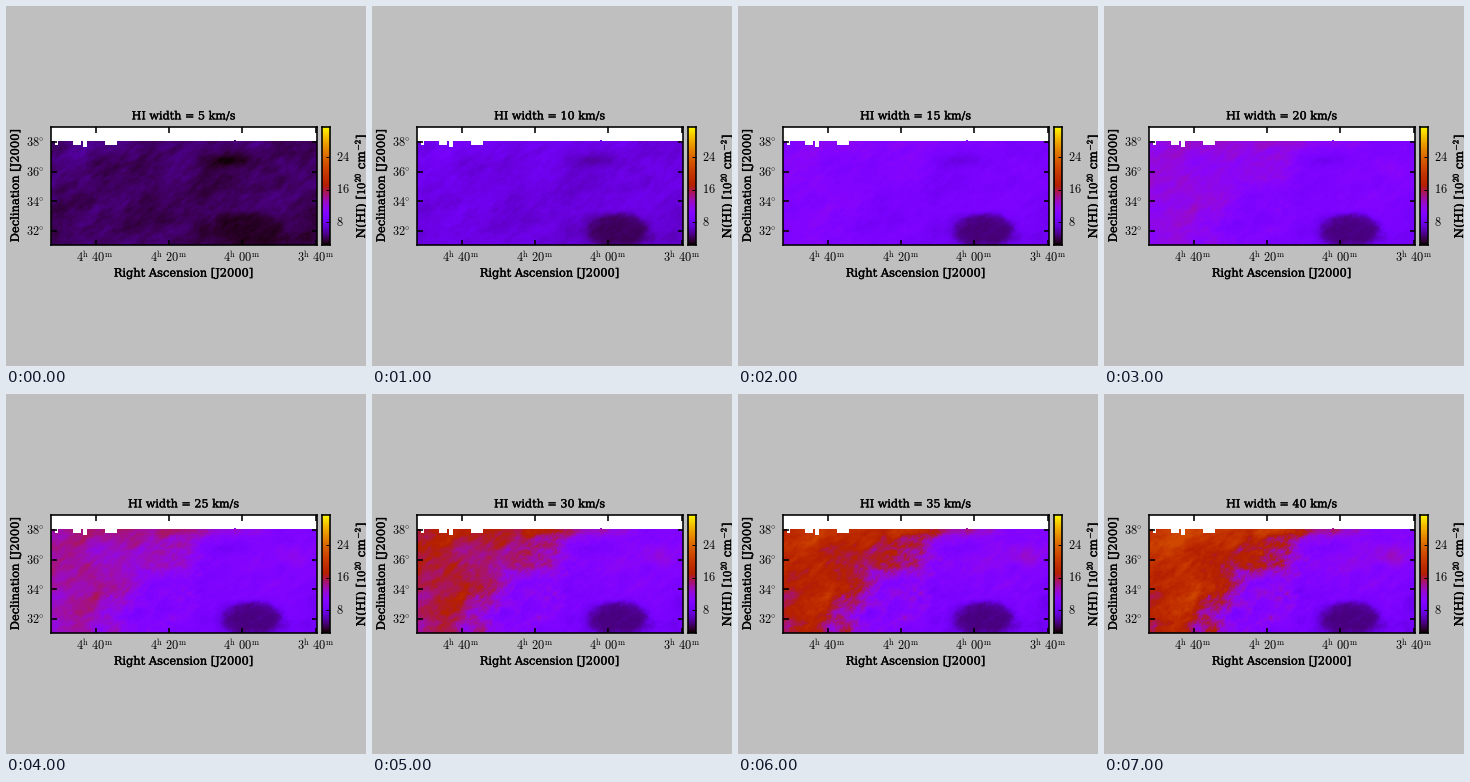
A matplotlib script for the animation above (8000 ms loop, 360x360 px).

```python
import numpy as np
import matplotlib.pyplot as plt
from matplotlib.animation import FuncAnimation
from matplotlib.patheffects import withStroke

SIZE = 360
LEFT, RIGHT, TOP, BOTTOM = 45, 311, 121, 239
DATA_TOP = 136
STEPS, WIDTH_STEP = 8, 5

plt.rcParams.update({"font.family": "DejaVu Serif", "mathtext.fontset": "cm"})
fig = plt.figure(figsize=(5, 5), dpi=72, facecolor="0.75")

X, Y = np.meshgrid(np.arange(LEFT, RIGHT) + 0.5, np.arange(TOP, BOTTOM) + 0.5)


def noise(seed, slope, stretch):
    """Power-law noise, drawn out along the rising diagonal."""
    white = np.random.default_rng(seed).normal(size=X.shape)
    ky = np.fft.fftfreq(X.shape[0])[:, None]
    kx = np.fft.fftfreq(X.shape[1])[None, :]
    a = np.radians(33)
    along = kx * np.cos(a) - ky * np.sin(a)
    across = kx * np.sin(a) + ky * np.cos(a)
    k = np.hypot(along * stretch, across) + 0.012
    field = np.fft.ifft2(np.fft.fft2(white) * k ** -slope).real
    return (field - field.mean()) / field.std()


def bump(x, y, sx, sy):
    return np.exp(-((X - x) / sx) ** 2 - ((Y - y) / sy) ** 2)


def sigmoid(z):
    return 1 / (1 + np.exp(-np.clip(z, -40, 40)))


CLOUD, WISPS, EDGE = noise(4, 1.7, 1.8), noise(11, 1.6, 2.2), noise(23, 1.6, 1.3)

# Share of the cloud on the left of a soft diagonal border
EAST = sigmoid((92 + (BOTTOM - Y) * 1.02 - X + 15 * EDGE) / 20)

# Regions that stay faint, brighten with width, or brighten late
COLD = 0.035 * (bump(218, 155, 28, 7) + bump(235, 225, 50, 20))
WARM = (0.09 * bump(290, 163, 13, 10) + 0.12 * bump(205, 138, 52, 5)
        + 0.05 * bump(240, 163, 50, 22))
LATE = 0.25 * bump(75, 150, 40, 18)

radius = ((X - 248) / 31) ** 2 + ((Y - 225) / 17) ** 2
HOLE = sigmoid(5 * (1 - radius + 0.13 * EDGE))

# Survey edge: empty top strip with a few ragged notches and one stray cell
EMPTY = Y < DATA_TOP
for x0, x1, depth in [(49, 52, 4), (67, 75, 4), (77, 81, 6), (99, 111, 4)]:
    EMPTY |= (X > x0) & (X < x1) & (Y < DATA_TOP + depth)
EMPTY &= ~((abs(X - 229) < 1) & (Y > DATA_TOP - 1))


def column_density(width):
    base = 0.245 * (1 - np.exp(-(width / 9.3) ** 2))
    grow = sigmoid((width - 26) / 6)
    tex = (1 - 0.6 * grow) * WISPS + (0.3 + 0.6 * grow) * CLOUD
    v = base + 0.35 * grow * EAST
    v = v + (0.011 + grow * (0.012 + 0.016 * EAST)) * tex
    v = v - (1 - 0.4 * grow) * COLD + grow * WARM - grow * (1 - grow) * LATE
    v = v * (1 - HOLE) + (base / 3 + 0.008 * WISPS) * HOLE
    return np.ma.array(np.clip(v, 0.006, 0.66), mask=EMPTY)


def add_axes(x0, x1):
    ax = fig.add_axes([x0 / SIZE, 1 - BOTTOM / SIZE,
                       (x1 - x0) / SIZE, (BOTTOM - TOP) / SIZE])
    ax.set_facecolor("white")
    for spine in ax.spines.values():
        spine.set_linewidth(1.6)
    return ax


def label(x, y, s, size=12.3, ha="center", **kw):
    return fig.text(x / SIZE, 1 - y / SIZE, s, fontsize=size, ha=ha,
                    va="baseline", rotation_mode="anchor", **kw)


def heading(x, y, s, size, **kw):
    ink = [withStroke(linewidth=0.35, foreground="black")]
    return label(x, y, s, size, path_effects=ink, **kw)


ax = add_axes(LEFT, RIGHT)
image = ax.imshow(column_density(WIDTH_STEP), cmap="gnuplot", vmin=0, vmax=1,
                  extent=(LEFT, RIGHT, BOTTOM, TOP), aspect="auto",
                  interpolation="nearest")
x_ticks = np.linspace(89.5, 309.9, 4)
y_ticks = np.linspace(136, 225, 4)
ax.set_xticks(x_ticks, [])
ax.set_yticks(y_ticks, [])
ax.tick_params(direction="in", length=5.5, width=1.6, top=True, right=True)

bar = add_axes(316, 324)
bar.imshow(np.linspace(1, 0, 256)[:, None], cmap="gnuplot",
           extent=(0, 1, BOTTOM, TOP), aspect="auto")
bar_ticks = np.linspace(151.3, 216.3, 3)
bar.set_xticks([])
bar.set_yticks(bar_ticks, [])
bar.tick_params(direction="in", length=4, width=1, left=False, right=True)

for i, x in enumerate(x_ticks):
    h, m = divmod(280 - 20 * i, 60)
    label(x - 0.5, 256, rf"${h}^\mathrm{{h}}\;{m:02d}^\mathrm{{m}}$")
for i, y in enumerate(y_ticks):
    label(38.5, y + 4.2, rf"${38 - 2 * i}^{{\circ}}$", ha="right")
for i, y in enumerate(bar_ticks):
    label(330, y + 3.6, f"${24 - 8 * i}$", ha="left")

heading(177.5, 270.6, "Right Ascension [J2000]", 11.4)
heading(12.8, 179.5, "Declination [J2000]", 11.5, rotation=90)
heading(359, 180, r"N(HI) [$10^{20}$ cm$^{-2}$]", 12, rotation=90)
title = heading(177.8, 113.4, "", 11.2)


def draw(i):
    width = WIDTH_STEP * (i + 1)
    image.set_data(column_density(width))
    title.set_text(f"HI width = {width} km/s")
    return image, title


anim = FuncAnimation(fig, draw, frames=STEPS, interval=1000, repeat=True)
plt.show()
```
